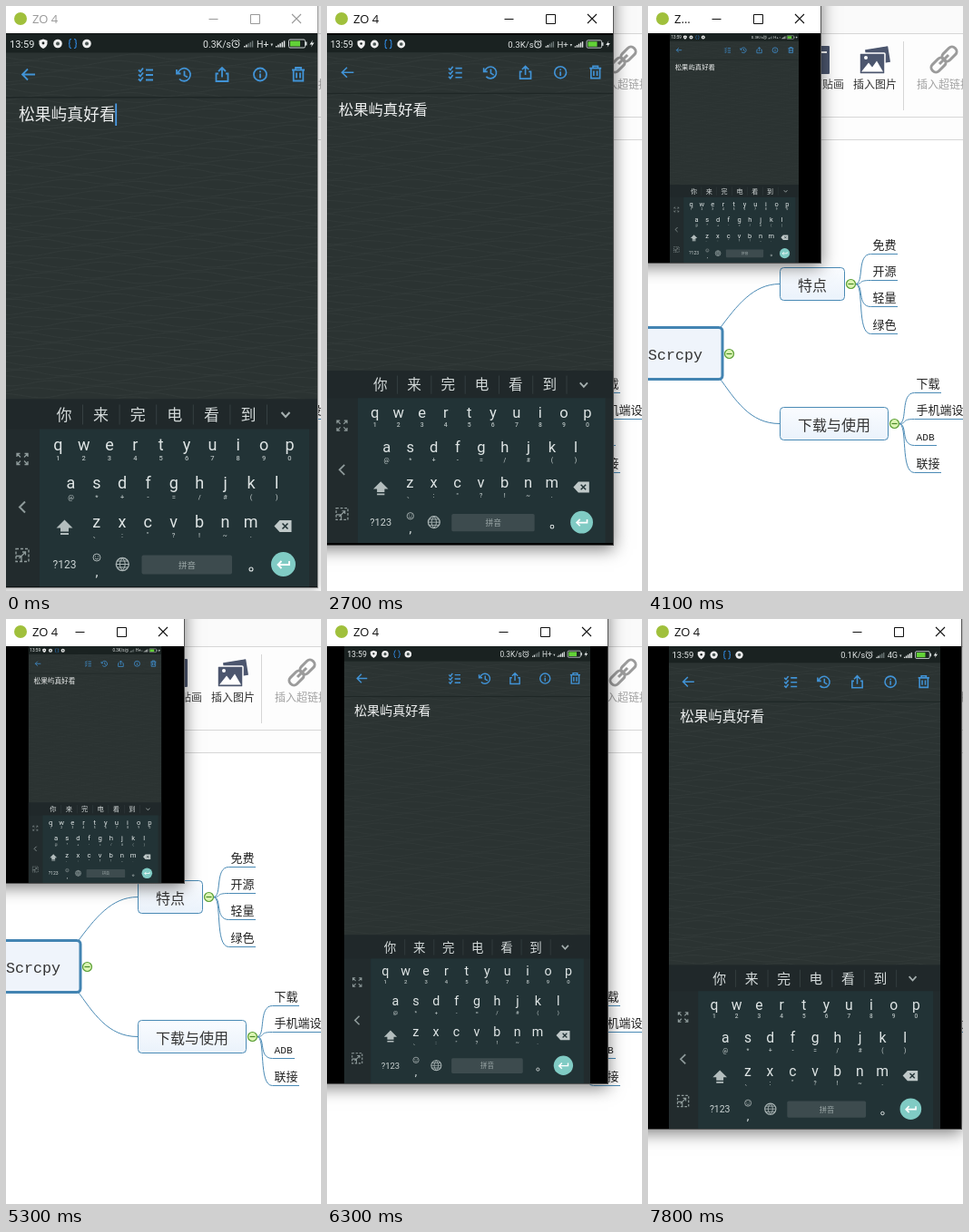
Animation of 347 by 645 pixels, one loop 8 s. Source, as an HTML page with a canvas:

```html
<!DOCTYPE html>
<html lang="zh">
<head>
<meta charset="utf-8">
<title>Resizing window</title>
<style>
html, body { margin: 0; width: 100%; height: 100%; overflow: hidden; background: #fff; }
canvas { display: block; width: 347px; height: 645px; }
</style>
</head>
<body>
<canvas id="stage"></canvas>
<script>
const W = 347, H = 645, LOOP = 8000;
const PHONE_W = 343, PHONE_H = 610, BAR = 30;
const CJK = '"Noto Sans CJK SC", "Noto Sans CJK", sans-serif';
const UI = 'Roboto, "Noto Sans CJK SC", sans-serif';
const canvas = document.getElementById('stage');
const ctx = canvas.getContext('2d');
const dpr = window.devicePixelRatio || 1;
canvas.width = W * dpr;
canvas.height = H * dpr;

// time, window width, window height
const SIZES = [
  [2400, 343, 641], [2700, 315, 594], [3300, 209, 437], [4100, 190, 283],
  [4800, 190, 283], [5000, 191, 283], [5200, 191, 283], [5700, 262, 391],
  [6100, 303, 468], [6300, 309, 512], [6700, 326, 549], [6800, 326, 549],
  [7200, 345, 562]
];

// Monotone cubic through the size keys
function sizeAt(t, k) {
  const n = SIZES.length - 1;
  if (t <= SIZES[0][0]) return SIZES[0][k];
  if (t >= SIZES[n][0]) return SIZES[n][k];
  let i = 0;
  while (t >= SIZES[i + 1][0]) i++;
  const slope = j => j < 0 || j >= n ? 0
    : (SIZES[j + 1][k] - SIZES[j][k]) / (SIZES[j + 1][0] - SIZES[j][0]);
  const tangent = j => {
    const a = slope(j - 1), b = slope(j);
    return a * b > 0 ? 2 * a * b / (a + b) : 0;
  };
  const [t0, t1] = [SIZES[i][0], SIZES[i + 1][0]];
  const d = t1 - t0, u = (t - t0) / d, u2 = u * u, u3 = u2 * u;
  return Math.round((2 * u3 - 3 * u2 + 1) * SIZES[i][k] + (u3 - 2 * u2 + u) * d * tangent(i)
    + (3 * u2 - 2 * u3) * SIZES[i + 1][k] + (u3 - u2) * d * tangent(i + 1));
}

function rect(x, y, w, h, color) {
  ctx.fillStyle = color;
  ctx.fillRect(x, y, w, h);
}

function text(s, x, y, size, color, align = 'left', family = UI, weight = 400) {
  ctx.font = `${weight} ${size}px ${family}`;
  ctx.textAlign = align;
  ctx.fillStyle = color;
  ctx.fillText(s, x, y);
}

function line(d, color, width = 1, x = 0, y = 0) {
  ctx.save();
  ctx.translate(x, y);
  ctx.strokeStyle = color;
  ctx.lineWidth = width;
  ctx.stroke(new Path2D(d));
  ctx.restore();
}

function shape(d, color, x = 0, y = 0) {
  ctx.save();
  ctx.translate(x, y);
  ctx.fillStyle = color;
  ctx.fill(new Path2D(d));
  ctx.restore();
}

function dot(x, y, r, color, stroke, width = 1) {
  ctx.beginPath();
  ctx.arc(x, y, r, 0, Math.PI * 2);
  if (color) { ctx.fillStyle = color; ctx.fill(); }
  if (stroke) { ctx.strokeStyle = stroke; ctx.lineWidth = width; ctx.stroke(); }
}

function box(x, y, w, h, r, fill, stroke, width = 1) {
  ctx.beginPath();
  ctx.roundRect(x, y, w, h, r);
  if (fill) { ctx.fillStyle = fill; ctx.fill(); }
  if (stroke) { ctx.strokeStyle = stroke; ctx.lineWidth = width; ctx.stroke(); }
}

/* ---------- mind map page ---------- */

const BLUE = '#4a8ab5', SLATE = '#4c566e', RULE = '#d6d6d6';

function photo(x, y, w, h, angle) {
  ctx.save();
  ctx.translate(x, y);
  ctx.rotate(angle);
  box(-w / 2, -h / 2, w, h, 1, SLATE, '#fff', 1.5);
  ctx.restore();
}

function ribbon() {
  rect(0, 0, W, 30, '#fafafa');
  rect(0, 30, W, 118, '#fdfdfd');
  for (const y of [30, 122, 147]) rect(0, y, W, 1, RULE);
  rect(281, 39, 1, 76, RULE);
  box(178, 44, 22, 31, 1, SLATE);
  rect(180, 50, 17, 2, '#fff');
  text('剪贴画', 198, 91, 12, '#444', 'center', CJK);
  photo(253, 55, 27, 19, -0.16);
  photo(247, 63.5, 28, 23, 0);
  shape('M-12 9L-4 -1L0 4L5 -3L12 9Z', '#fff', 247, 63.5);
  dot(240, 57, 2, '#fff');
  text('插入图片', 250, 91, 12, '#333', 'center', CJK);
  for (const [x, y] of [[332, 53], [320, 65]]) {
    ctx.save();
    ctx.translate(x, y);
    ctx.rotate(-Math.PI / 4);
    box(-9, -5, 18, 10, 4.5, null, '#9b9b9b', 3);
    ctx.restore();
  }
  line('M-5 5L5 -5', '#9b9b9b', 3, 326, 59);
  text('插入超链接', 326, 91, 12, '#a2a2a2', 'center', CJK);
}

function node(label, x, y, w) {
  const g = ctx.createLinearGradient(0, y, 0, y + 36);
  g.addColorStop(0, '#fafcff');
  g.addColorStop(1, '#eaf2fb');
  box(x, y, w, 36, 4, g, BLUE);
  text(label, x + w / 2, y + 25.5, 16, '#333', 'center', CJK);
}

function leaves(x, y, labels) {
  for (const [label, ly, end, family, size] of labels) {
    line(`M${x + 5} ${y}C${x + 15} ${y} ${x + 6} ${ly} ${x + 22} ${ly}H${end}`, BLUE);
    text(label, x + 24, ly - 5.5, size || 13, '#222', 'left', family || CJK);
  }
}

function minus(x, y) {
  dot(x, y, 5, '#dcf5b4', '#5a9e35', 1.2);
  line('M-3 0H3', '#4a8a2a', 1.2, x, y);
}

function page() {
  rect(0, 0, W, H, '#fff');
  ribbon();
  line('M78 357C98 330 116 306.5 145 306.5M78 409C96 434 112 460.5 145 460.5', BLUE);
  box(-40, 354.5, 122, 57, 4, '#eff4fb', '#4384b2', 3);
  text('Scrcpy', 0, 390, 16.7, '#333', 'left', '"Liberation Mono", monospace');
  node('特点', 145.5, 288.5, 71);
  node('下载与使用', 145.5, 442.5, 119);
  leaves(223.5, 306.5, [['免费', 273.5, 275], ['开源', 302.5, 275],
    ['轻量', 331.5, 275], ['绿色', 361.5, 275]]);
  leaves(271.5, 460.5, [['下载', 426.5, 323], ['手机端设置', 455.5, 362],
    ['ADB', 484.5, 318, '"Liberation Mono", monospace', 11.2], ['联接', 514.5, 323]]);
  minus(89.5, 383.5);
  minus(223.5, 306.5);
  minus(271.5, 460.5);
}

/* ---------- phone screen, in its own 343 x 610 units ---------- */

const SKY = '#4193d6', PALE = '#dfe5e5', DIM = '#8f9b9b';

function bars(x, lit) {
  for (let i = 0; i < 5; i++) {
    const h = 1.5 + i * 1.4;
    rect(x + i * 2.2, 15 - h, 1.5, h, i < lit ? '#e4e8e8' : '#6b7676');
  }
}

function statusBar(t) {
  const late = t >= 7800;
  rect(0, 0, PHONE_W, 21, '#1a2221');
  text('13:59', 4, 15, 11, '#e8ecec');
  shape('M0 -5L4.5 -3.5V0Q4 3.5 0 5.5Q-4 3.5 -4.5 0V-3.5Z', '#f0f0f0', 41, 11);
  dot(41, 10.5, 1.4, '#1a2221');
  for (const x of [57, 89]) {
    dot(x, 11, 4.8, '#eee');
    dot(x, 11, 2, '#4a5553');
  }
  line('M-1.5 -5Q-4 -5 -3.5 -2Q-3.5 0 -4.5 0Q-3.5 0 -3.5 2Q-4 5 -1.5 5M1.5 -5Q4 -5 3.5 -2Q3.5 0 4.5 0Q3.5 0 3.5 2Q4 5 1.5 5',
    '#2f86dc', 1.2, 73.5, 11);
  text(late ? '0.1K/s' : '0.3K/s', 217, 15, 10.5, '#e0e4e4');
  dot(253, 11.5, 3.8, null, '#dde2e2', 1.1);
  line('M0 -2V.5H2M-4.5 -3.5L-2.5 -5M4.5 -3.5L2.5 -5', '#dde2e2', 1, 253, 11.5);
  bars(262, 2);
  text(late ? '4G' : 'H+', 276, 15, 10.5, '#e0e4e4');
  const up = t >= 900 && t < 1800;
  shape(up ? 'M0 3L1.3 0L2.6 3Z' : 'M0 0H2.6L1.3 3Z', '#cdd3d3', 291.5, 11);
  bars(297, 5);
  box(311.5, 6.5, 18, 9, 1.5, null, '#cfd6d6');
  rect(313, 8, 11, 6, '#62d237');
  rect(330, 9, 1.5, 4, '#cfd6d6');
  shape('M1 -4L-2.5 1H0L-1 4L2.5 -1H0Z', '#e8ecec', 337, 11);
}

function toolbar() {
  rect(0, 69.5, PHONE_W, 1.5, '#1f2726');
  const icons = [
    [25, 'M7 0H-7M-1 -6L-7 0L-1 6'],
    [154, 'M-8 -5l2 2l3 -4M-8 0l2 2l3 -4M-8 5l2 2l3 -4M0 -5H8M0 .5H8M0 6H8'],
    [196, 'M-6.5 -2A7 7 0 1 1 -5 5M-8 -5.5V-1H-3.5M.5 -4V1L4 3'],
    [238, 'M-4 -1H-6.5V7.5H6.5V-1H4M0 3V-7M-4 -3.5L0 -7.5L4 -3.5'],
    [280, 'M7 0A7 7 0 1 1 -7 0A7 7 0 1 1 7 0M0 -1V4M0 -4V-2.3'],
    [322, 'M-7 -5H7M-3 -5V-7.5H3V-5M-5.3 -5V7H5.3V-5M-2 -2V4M2 -2V4']
  ];
  for (const [x, d] of icons) line(d, SKY, 1.8, x, 45);
}

const waves = new Path2D();
for (let row = 0; row < 65; row++) {
  const y0 = 26 + row * 6;
  for (let x = 0; x <= PHONE_W; x += 7) {
    const y = y0 + 2.2 * Math.sin(x / 13 + row * 1.9) + 1.4 * Math.sin(x / 29 - row);
    x ? waves.lineTo(x, y) : waves.moveTo(x, y);
  }
}

function note(t) {
  rect(0, 0, PHONE_W, PHONE_H, '#2b3332');
  ctx.strokeStyle = 'rgba(255,255,255,.028)';
  ctx.lineWidth = 1.2;
  ctx.stroke(waves);
  text('松果屿真好看', 14, 95.7, 17.8, '#eceeee', 'left', CJK);
  const blink = t < 200 || (t >= 600 && t < 1100) || (t >= 1500 && t < 2000);
  if (blink) rect(120.3, 77, 1.8, 24.5, '#4a9be6');
}

function keyRow(keys, subs, x0, y, subY) {
  [...keys].forEach((k, i) => {
    const x = x0 + i * 28.35;
    text(k, x, y, 18, PALE, 'center');
    text(subs[i], x, subY, 7.5, '#b4bebe', 'center', UI, 500);
  });
}

function keyboard() {
  rect(0, 403, PHONE_W, 207, '#222b2d');
  rect(0, 403, PHONE_W, 33, '#20282a');
  rect(37, 436, 297, 174, '#223336');
  [...'你来完电看到'].forEach((c, i) => {
    const x = 64 + i * 40.6;
    text(c, x, 426.4, 17, '#d3d9d9', 'center', CJK);
    rect(x + 20, 409, 1, 22, '#364042');
  });
  line('M-4.5 -2.5L0 2.5L4.5 -2.5', '#a5afaf', 2, 308, 420);

  keyRow('qwertyuiop', '1234567890', 57.3, 459.5, 470.5);
  keyRow('asdfghjkl', '@*+-=/#()', 71.5, 501, 513.5);
  keyRow('zxcvbnm', '、:"?!~.', 99.6, 544, 555.5);

  shape('M0 -8L9 1H4.5V5H-4.5V1H-9ZM-4.5 6.5H4.5V8.5H-4.5Z', '#b3bdbd', 64.5, 544);
  shape('M-10 0L-4 -6.5H9V6.5H-4Z', '#c0c9c9', 305.5, 543);
  line('M-1 -3L5 3M5 -3L-1 3', '#223336', 1.6, 305.5, 543);

  text('?123', 64.5, 589.5, 12, '#cbd3d3', 'center');
  dot(100, 577.5, 4, null, '#aab4b4');
  line('M-2 1Q0 3.2 2 1M-1.5 -1.7V-.6M1.5 -1.7V-.6', '#aab4b4', 0.9, 100, 577.5);
  text(',', 100, 598, 15, PALE, 'center');
  dot(128.3, 585, 7, null, '#a9b4b4', 1.3);
  line('M-7 0H7M-6 -3.5H6M-6 3.5H6M0 -7Q-6 0 0 7M0 -7Q6 0 0 7', '#a9b4b4', 1, 128.3, 585);
  box(149.5, 575, 99.5, 21, 2, '#3d4b4e');
  text('拼音', 199.5, 589, 9.5, '#9ca8a8', 'center', CJK);
  dot(270, 590.5, 2, null, PALE, 1.1);
  dot(305.5, 585, 13.5, '#80cbc4');
  line('M6.5 -4V0H-6M-2 -4L-6 0L-2 4', '#fff', 1.8, 305.5, 585.5);

  line('M-2 -2L-6 -6M-6 -2.5V-6H-2.5M2 -2L6 -6M6 -2.5V-6H2.5M-2 2L-6 6M-6 2.5V6H-2.5M2 2L6 6M6 2.5V6H2.5',
    DIM, 1.3, 18, 469);
  line('M3 -6L-3 0L3 6', DIM, 2, 18, 522);
  ctx.setLineDash([3, 2]);
  line('M-7 -7H7V7H-7Z', DIM, 1.4, 18, 575);
  ctx.setLineDash([]);
  line('M-3.5 3.5L3.5 -3.5M0 -3.5H3.5V0M-7 1H-1V7', DIM, 1.3, 18, 575);
}

/* ---------- desktop window ---------- */

function appWindow(t) {
  const w = sizeAt(t, 1), h = sizeAt(t, 2), active = t >= 2300;
  const ink = active ? '#111' : '#999';
  ctx.save();
  ctx.shadowColor = active ? 'rgba(0,0,0,.5)' : 'rgba(0,0,0,.28)';
  ctx.shadowBlur = (active ? 17 : 10) * dpr;
  ctx.shadowOffsetY = (active ? 4 : 2) * dpr;
  rect(-20, -20, w + 21, h + 21, active ? '#555' : '#999');
  ctx.restore();

  rect(0, 0, w, BAR, '#fff');
  rect(0, BAR, w, h - BAR, '#000');
  dot(16, 14, 7, '#a0c03c');
  text(w < 196 ? 'Z...' : 'ZO 4', 29, 19, 13, ink, 'left', '"Open Sans", sans-serif');
  line('M-5 .5H5', ink, 1, w - 114.5, 14);
  line('M-4.5 -4.5H5.5V5.5H-4.5Z', ink, 1, w - 69, 14);
  line('M-5 -5L5 5M5 -5L-5 5', ink, 1.1, w - 23, 14);

  const s = Math.min(w / PHONE_W, (h - BAR) / PHONE_H);
  ctx.save();
  ctx.translate((w - PHONE_W * s) / 2, BAR + (h - BAR - PHONE_H * s) / 2);
  ctx.scale(s, s);
  ctx.beginPath();
  ctx.rect(0, 0, PHONE_W, PHONE_H);
  ctx.clip();
  note(t);
  statusBar(t);
  toolbar();
  keyboard();
  ctx.restore();
}

function draw() {
  const t = Math.floor(performance.now() % LOOP / 100) * 100;
  ctx.setTransform(dpr, 0, 0, dpr, 0, 0);
  page();
  appWindow(t);
  requestAnimationFrame(draw);
}
draw();
</script>
</body>
</html>
```
